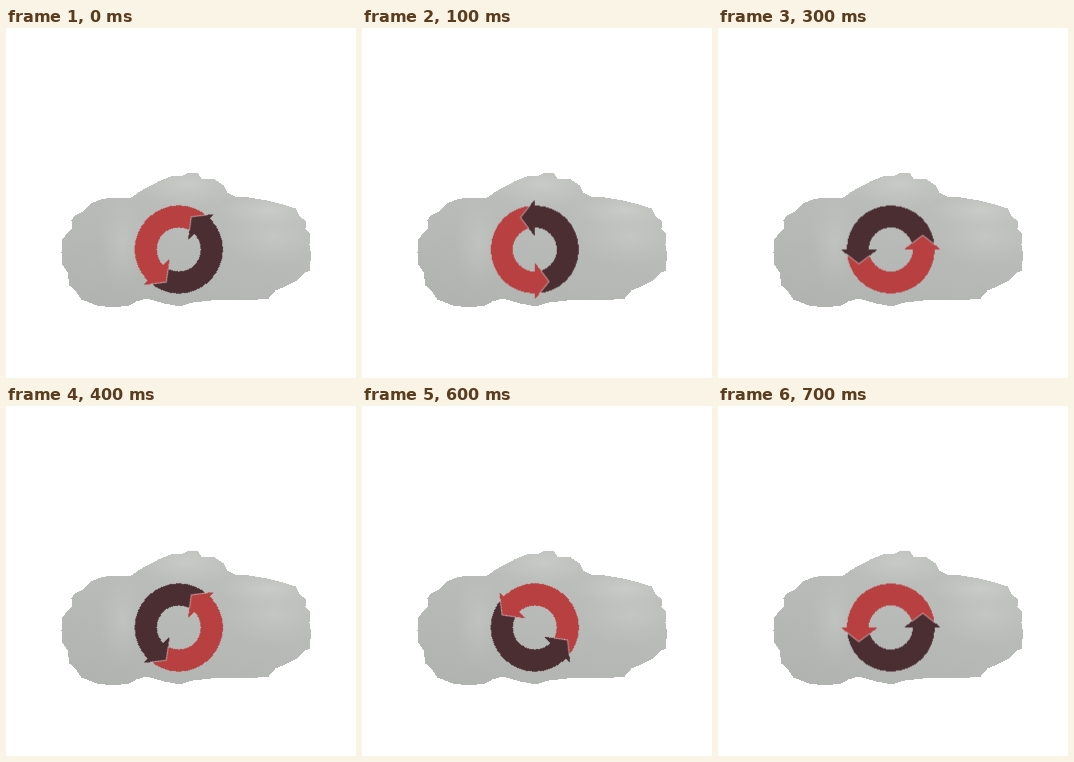
Write an HTML page that moves like this. It is 350 px wide and 350 px high and loops after 800 ms.

```html
<!DOCTYPE html>
<html lang="en">
<head>
<meta charset="utf-8">
<title>Turning arrows</title>
<style>
  html, body { margin: 0; width: 100%; height: 100%; overflow: hidden; background: #fff; }
  svg { display: block; width: 100%; height: 100%; }
  .cloud, .ring { shape-rendering: crispEdges; }
  .spin { animation: turn 800ms steps(8, end) infinite; }
  .red { color: #b94041; }
  .dark { color: #4b2e32; }
  .half, .head { fill: currentColor; }
  .edge { fill: none; stroke: #ece6e6; stroke-width: .9; stroke-opacity: .75; shape-rendering: auto; }
  @keyframes turn { from { transform: rotate(-45deg); } to { transform: rotate(-405deg); } }
</style>
</head>
<body>
<svg viewBox="0 0 350 350">
  <defs>
    <linearGradient id="base" x1="0" y1="1" x2=".5" y2="0">
      <stop offset="0" stop-color="#afb2ae"/>
      <stop offset=".5" stop-color="#b6b9b5"/>
      <stop offset="1" stop-color="#bcbfbb"/>
    </linearGradient>
    <radialGradient id="glow">
      <stop offset="0" stop-color="#cfd1cd" stop-opacity=".8"/>
      <stop offset="1" stop-color="#c8cac6" stop-opacity="0"/>
    </radialGradient>
    <path id="puff" d="M55 224L56 211 61 204 66 199 65 192 68 187 78 182 84 175 94 171 104 169 123 170 132 164 140 159 152 153 164 148 177 147 182 144 191 144 195 150 208 151 217 157 221 164 228 168 242 169 260 172 276 176 289 180 293 188 300 193 299 200 304 206 303 216 305 228 303 236 304 242 298 244 292 251 281 257 269 262 262 270 240 272 213 271 186 274 173 278 158 275 140 270 130 273 122 277 106 279 90 277 75 271 69 262 63 257 61 244 56 236Z"/>
    <clipPath id="inside"><use href="#puff"/></clipPath>
    <clipPath id="band">
      <path clip-rule="evenodd" d="M-44 0A44 44 0 0 1 44 0A44 44 0 0 1 -44 0ZM-22 0A22 22 0 0 1 22 0A22 22 0 0 1 -22 0Z"/>
    </clipPath>
    <path id="tail" class="half" d="M-44 0A44 44 0 0 1 44 0H22A22 22 0 0 0 -22 0Z"/>
    <g id="tip">
      <path class="head" d="M-50 0H-44V-2H-22V0H-13L-32 14.3Z"/>
      <path class="edge" clip-path="url(#band)" d="M-50 0L-32 14.3L-13 0"/>
    </g>
  </defs>

  <g class="cloud" transform="translate(.5 .5)">
    <use href="#puff" fill="url(#base)"/>
    <g clip-path="url(#inside)" fill="url(#glow)">
      <ellipse cx="268" cy="208" rx="52" ry="30" opacity=".6"/>
      <ellipse cx="116" cy="214" rx="24" ry="48" opacity=".5"/>
      <ellipse cx="180" cy="156" rx="56" ry="24" opacity=".8"/>
      <ellipse cx="262" cy="182" rx="52" ry="18" opacity=".9"/>
    </g>
  </g>

  <g class="ring" transform="translate(172.8 221.5)">
    <g class="spin">
      <g class="red"><use href="#tail"/></g>
      <g class="dark" transform="rotate(180)"><use href="#tail"/></g>
      <g class="red"><use href="#tip"/></g>
      <g class="dark" transform="rotate(180)"><use href="#tip"/></g>
    </g>
  </g>
</svg>
</body>
</html>
```
